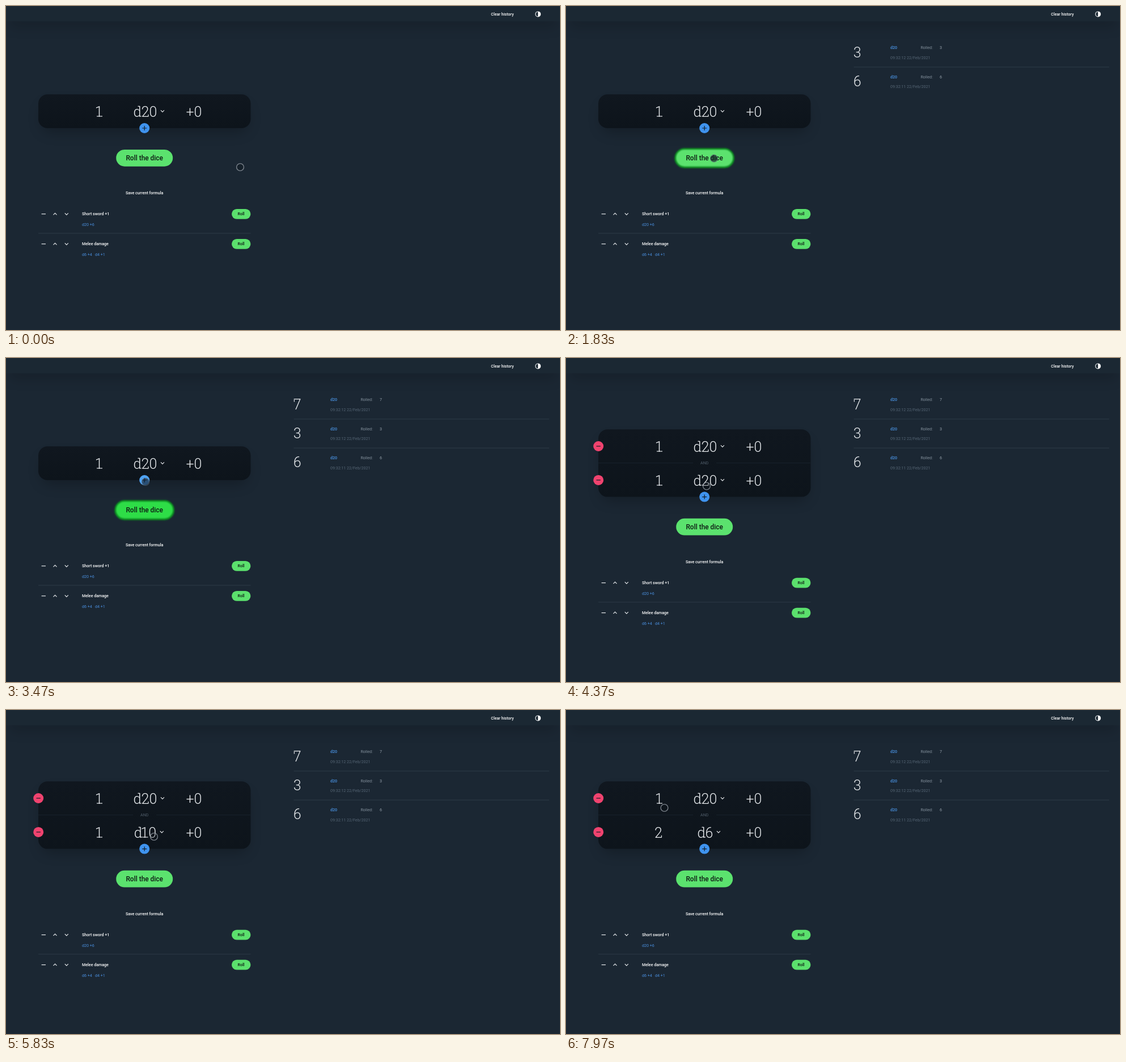
Animation, 977 px wide and 573 px high, one loop 8 s. Source, as an HTML page:

```html
<!DOCTYPE html>
<html lang="en">
<head>
<meta charset="utf-8">
<title>Dice roller</title>
<style>
  html, body { margin: 0; width: 100%; height: 100%; overflow: hidden; background: #1b2733; }
  svg { display: block; width: 977px; height: 573px; font: 400 7.1px Roboto, sans-serif; }
  .mid { text-anchor: middle; }
  .med { font-weight: 500; }
  .big { font-size: 25px; font-weight: 300; fill: #e6e9ec; }
  .slab { stroke: #e6e9ec; stroke-width: 1.2; fill: none; }
  .icon { stroke: #e6e9ec; stroke-width: 1.2; fill: none; }
  .dark { stroke: #101a24; stroke-width: 1.2; fill: none; }
  .rule { stroke: #2d3a47; stroke-width: 1; }
</style>
</head>
<body>
<svg viewBox="0 0 977 573">
  <defs>
    <filter id="soft" filterUnits="userSpaceOnUse" x="-60" y="-60" width="1100" height="700">
      <feGaussianBlur stdDeviation="12.5"/>
    </filter>
    <filter id="glow" filterUnits="userSpaceOnUse" x="170" y="230" width="150" height="110">
      <feGaussianBlur stdDeviation="0.8"/>
    </filter>
    <linearGradient id="panel" x2="0" y2="1">
      <stop offset="0" stop-color="#10171f"/>
      <stop offset="1" stop-color="#0d141b"/>
    </linearGradient>
  </defs>
  <g id="scene"></g>
  <g id="cursor">
    <circle r="6.4" stroke-width="1.4"/>
  </g>
</svg>
<script>
const LOOP = 8000;
const scene = document.getElementById('scene');
const cursor = document.getElementById('cursor');
const ring = cursor.firstElementChild;

// time, x, y
const path = [
  [0, 413, 285], [30, 413, 285], [800, 261, 269.5], [2400, 261, 269.5], [3200, 246, 219],
  [3650, 246, 219], [4370, 248, 226.5], [5200, 261, 224], [5900, 261, 224], [7000, 263, 243],
  [7420, 166, 218], [7650, 166, 218], [7970, 173.5, 173], [8000, 173.5, 173]
];
const presses = [[930, 1050], [1380, 1480], [1790, 1900], [3420, 3530]];
const rolls = [[1050, 6, 11], [1480, 3, 12], [1900, 7, 12]];
const ADD = 3530;

// Slab serifs laid over the light digits, relative to each glyph's origin
const serifs = {
  1: 'M3.2 -.6h10',
  2: 'M12.5 -.6v-3.2',
  7: 'M1.6 -17.2v3.6',
  d: 'M11.5 -18.2h-3.4M11.5 -.6h3'
};
const advance = c => c === '1' ? 11.6 : 14.04;
const bigWidth = s => [...s].reduce((sum, c) => sum + advance(c), 0);

function big(s, cx, y) {
  let x = cx - bigWidth(s) / 2, marks = '';
  const xs = [...s].map(c => {
    const left = c === '1' ? x - 2.4 : x;
    if (serifs[c]) marks += `<path class="slab" d="${serifs[c]}" transform="translate(${left} ${y})"/>`;
    x += advance(c);
    return left.toFixed(2);
  });
  return `<text class="big" x="${xs.join(' ')}" y="${y}">${s}</text>${marks}`;
}

const text = (s, x, y, fill, cls = '', extra = '') =>
  `<text x="${x}" y="${y}" fill="${fill}" class="${cls}" ${extra}>${s}</text>`;
const line = (x1, x2, y, cls = 'rule', extra = '') =>
  `<path d="M${x1} ${y}H${x2}" class="${cls}" ${extra}/>`;
const box = (x, y, w, h, r, fill, extra = '') =>
  `<rect x="${x}" y="${y}" width="${w}" height="${h}" rx="${r}" fill="${fill}" ${extra}/>`;
const shadow = (x, y, w, h, r) =>
  box(x + 6, y + 18.5, w - 12, h - 12, r, '#000', 'opacity=".25" filter="url(#soft)"');
const chevron = (x, y, dir) =>
  `<path class="icon" d="M${x - 3} ${y - 1.5 * dir}l3 ${3 * dir}l3 ${-3 * dir}"/>`;
const minus = (x, y, cls) => line(x - 3.7, x + 3.7, y, cls);

function header() {
  return shadow(0, 0, 977, 27, 0) + box(0, 0, 977, 27, 0, '#1b2833') +
    text('Clear history', 875.3, 16.8, '#fff', 'mid med') +
    '<circle cx="938.2" cy="14.4" r="4.4" class="icon"/>' +
    '<path d="M938.2 10a4.4 4.4 0 0 1 0 8.8z" fill="#fff"/>';
}

function formulaRow(y, count, die, removable) {
  const cx = 245.5;
  return big(count, count === '1' ? 165 : 163, y + 9.3) + big(die, cx, y + 9.3) +
    chevron(cx + bigWidth(die) / 2 + 9.4, y - .5, 1) + big('+0', 331.5, y + 9.3) +
    (removable ? `<circle cx="57.2" cy="${y - .3}" r="9" fill="#f0436f"/>` + minus(57.2, y - .3, 'dark') : '');
}

function formula(s) {
  const top = s.two ? 126.3 : 156.3, h = s.two ? 119.3 : 59.7, end = top + h;
  let out = shadow(57, top, 374.5, h, 16) + box(57, top, 374.5, h, 16, 'url(#panel)');
  out += formulaRow(top + 30, '1', 'd20', s.two);
  if (s.two) {
    const dim = 'style="stroke:#19232d"';
    out += line(57, 224, 185.7, 'rule', dim) + line(265, 431, 185.7, 'rule', dim) +
      text('AND', 244.2, 187.8, '#52606d', 'mid') + formulaRow(216.2, s.count, s.die, true);
  }
  return out + `<circle cx="244.2" cy="${end}" r="9" fill="${s.addHover ? '#4fa3f5' : '#3f93ee'}"/>` +
    `<path class="dark" d="M240.2 ${end}h8m-4 -4v8"/>`;
}

function rollButton(s, dy) {
  const y = 254 + dy;
  const ringMark = s.focus
    ? box(192.3, y - 1.7, 103.8, 33.4, 16.7, '#0c8c22', 'stroke="#0c8c22" stroke-width="2" filter="url(#glow)"') : '';
  const fill = s.focus && !s.hover ? '#2ddd47' : '#5be26e';
  return ringMark + box(194.2, y, 100, 29.7, 14.85, fill, s.focus ? 'filter="url(#glow)"' : '') +
    text('Roll the dice', 244.2, y + 19.2, '#0e1a14', 'mid med', 'style="font-size:11.9px"');
}

function savedRow(y, name, parts) {
  return minus(66.3, y, 'icon') + chevron(86.5, y, -1) + chevron(106.8, y, 1) +
    text(name, 134, y + 2.4, '#fff', 'med') +
    parts.map((p, i) => text(p, 134 + i * 23, y + 21.5, '#4a90e0')).join('') +
    box(398, y - 8.9, 33.4, 17.9, 8.95, '#5be06d') +
    text('Roll', 414.6, y + 2.4, '#0e1a14', 'mid med');
}

function saved(dy) {
  return text('Save current formula', 244.2, 333.2 + dy, '#fff', 'mid med') +
    savedRow(367.8 + dy, 'Short sword +1', ['d20 +6']) + line(57, 431.5, 402 + dy) +
    savedRow(420.8 + dy, 'Melee damage', ['d6 +4', 'd4 +1']);
}

function history(n) {
  return rolls.slice(0, n).reverse().map(([, value, sec], i) => {
    const y = i * 51.2;
    return big(String(value), 513.8, y + 91) +
      text('d20', 572, y + 76.3, '#4b96e8', 'med') +
      text('Rolled:', 625.4, y + 76.3, '#83909c') +
      text(value, 659, y + 76.3, '#98a3ad') +
      text(`09:32:${sec} 22/Feb/2021`, 572, y + 94.2, '#566675') +
      (i < n - 1 ? line(507.5, 958, y + 108) : '');
  }).join('');
}

function stateAt(t) {
  return {
    two: t >= ADD,
    focus: t >= presses[0][0] && t < ADD,
    hover: t >= 600 && t < 2650,
    addHover: t >= 3050 && t < ADD,
    rolls: rolls.filter(r => t >= r[0]).length,
    die: t < 5200 ? 'd20' : t < 6450 ? 'd10' : 'd6',
    count: t < 7600 ? '1' : '2'
  };
}

function pointAt(t) {
  const i = Math.max(1, path.findIndex(p => p[0] > t));
  const [t0, x0, y0] = path[i - 1], [t1, x1, y1] = path[i];
  const u = (t - t0) / (t1 - t0), k = u * u * (3 - 2 * u);
  return [x0 + (x1 - x0) * k, y0 + (y1 - y0) * k];
}

let shown = '';
function render(t) {
  const s = stateAt(t), key = JSON.stringify(s);
  if (key !== shown) {
    const dy = s.two ? 29.8 : 0;
    scene.innerHTML = header() + formula(s) + rollButton(s, dy) + saved(dy) + history(s.rolls);
    shown = key;
  }
  const [x, y] = pointAt(t);
  const down = presses.some(([a, b]) => t >= a && t < b);
  cursor.setAttribute('transform', `translate(${x.toFixed(2)} ${y.toFixed(2)})`);
  ring.setAttribute('fill', down ? 'rgba(18,28,38,.62)' : 'rgba(10,16,22,.3)');
  ring.setAttribute('stroke', down ? 'rgba(90,105,115,.6)' : 'rgba(150,158,166,.8)');
}

const start = performance.now();
function tick() {
  render((performance.now() - start) % LOOP);
  requestAnimationFrame(tick);
}
tick();
</script>
</body>
</html>
```
